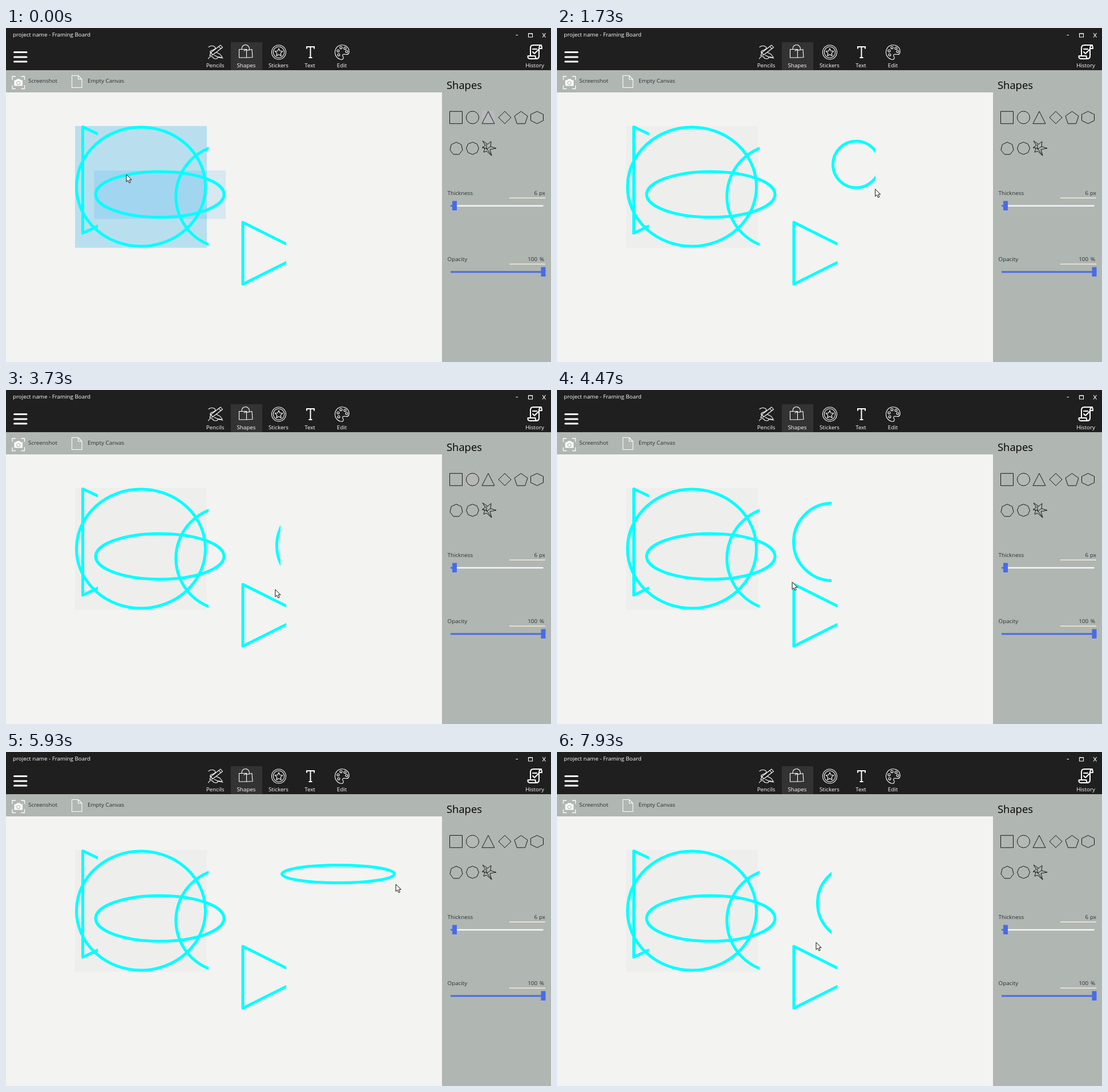
An HTML page that plays this animation: 955x586 px, repeating every 8000 ms.

```html
<!DOCTYPE html>
<html lang="en">
<head>
<meta charset="utf-8">
<title>Drawing shapes</title>
<style>
  html, body { margin: 0; width: 100%; height: 100%; overflow: hidden; background: #b0b6b2; }
  svg { display: block; width: 955px; height: 586px; }
  text { font: 9.8px "Open Sans", "Noto Sans", sans-serif; fill: #2b3133; }
  .light text { fill: #fff; }
  .mid { text-anchor: middle; }
  .end { text-anchor: end; }
  .icon { fill: none; stroke: #fff; stroke-width: 1.1; stroke-linejoin: round; stroke-linecap: round; }
  .ink { fill: none; stroke: #0ff; stroke-width: 5; stroke-linejoin: round; }
  .button { fill: none; stroke: #161819; stroke-width: 1; }
</style>
</head>
<body>
<svg viewBox="0 0 955 586">
  <defs>
    <clipPath id="clipSmall"><rect x="120" y="160" width="41" height="210"/></clipPath>
    <clipPath id="clipArc"><rect x="290" y="195" width="65" height="200"/></clipPath>
    <clipPath id="clipLarge"><rect x="405" y="330" width="86" height="130"/></clipPath>
    <clipPath id="clipDrag"><rect id="dragBox"/></clipPath>
  </defs>

  <rect width="955" height="586" fill="#b0b6b2"/>
  <rect width="955" height="74" fill="#1f1f1f"/>
  <rect x="394" y="25" width="55" height="49" fill="#333"/>
  <rect y="113" width="764" height="473" fill="#f3f3f1"/>

  <g class="light">
    <text x="12" y="15">project name - Framing Board</text>
    <g class="mid">
      <text x="366.5" y="69">Pencils</text>
      <text x="421" y="69">Shapes</text>
      <text x="477.5" y="69">Stickers</text>
      <text x="532.5" y="69">Text</text>
      <text x="588.5" y="69">Edit</text>
      <text x="926.5" y="69">History</text>
    </g>
  </g>

  <g class="icon">
    <path d="M893.5 12.5h3.5M915.5 9.500h7v6.500h-7zM915.500 10h7M940 9l5.500 7.500M945.500 9l-5.500 7.500" stroke-linecap="butt"/>
    <path d="M14.500 42.500h21.500M14.500 51h21.500M14.500 59h21.500" stroke-width="3"/>
    <!-- pencils -->
    <path d="M355 33.500q5-4 10-1t-2 6q-7 2-5 5M359 43l17-13 3.500 4-17 13-5.500 1.500zM373 32.500l3.500 4M359 43l3.500 4"/>
    <path d="M354.500 54q2-4 5-4t4 3q5 2 7 0 1-3 4-2 3 2 5.500 2M365 48l9 4 5-1-4-5-6-3"/>
    <!-- shapes -->
    <path d="M413 36.500a6.700 6.700 0 1 1 13 2M408.500 37.500h13v14.500h-13zM417 40l5-2.500M421.500 39.500l9.500-2 1 14-10 .5"/>
    <!-- stickers -->
    <circle cx="478" cy="42.500" r="12.500"/>
    <circle cx="478" cy="42.500" r="9.700"/>
    <path id="star"/>
    <!-- text -->
    <path d="M527 36.500v-3.500h13v3.500M533.500 33v19M530.500 52h6" stroke-width="2" stroke-linecap="butt" stroke-linejoin="miter"/>
    <!-- palette -->
    <path d="M577 39c2-7 8-10 14-9 7 1 11 7 10 13-1 4-4 4-8 3-4 0-4 3-2 5 1 3-1 5-5 4-7-2-11-9-9-16z"/>
    <circle cx="582" cy="40" r="2"/><circle cx="587" cy="34.500" r="2"/><circle cx="594" cy="35.500" r="2"/>
    <circle cx="597" cy="41" r="2"/><circle cx="583" cy="47" r="2"/>
    <!-- history -->
    <path d="M919 48v-13q0-5 5-5h14q-4 1-4 6v13q0 5-5 5h-11q-4 0-3.500-5h13q0 5 3 5M934 36h5q0-6-3-6M923 37h7M923 42l3 3 8-8" stroke-width="2"/>
    <!-- screenshot -->
    <path d="M11 90.500v-5.500h5.500M27 85h5.500v5.500M32.500 101v5.500h-5.500M16.500 106.500h-5.500v-5.500" stroke-width="1.300"/>
    <path d="M15 92h3l1.500-2h4.500l1.500 2h3v9h-13.500z" fill="#fff"/>
    <circle cx="21.700" cy="96.500" r="3" fill="#fff" stroke="#b0b6b2"/>
    <!-- empty canvas -->
    <path d="M115.500 83.500h11l6.500 6.500v14.500h-17.500zM126.500 83.500v6.500h6.500"/>
  </g>
  <text x="39" y="96">Screenshot</text>
  <text x="143" y="96">Empty Canvas</text>

  <text x="772" y="107" style="font-size:18.4px;fill:#000">Shapes</text>
  <rect id="picked" y="145" width="23" height="24" fill="#b9babd"/>
  <g id="buttons" class="button">
    <circle cx="817.5" cy="157" r="11"/>
    <path d="M835 198l9 6 6-5-1 9 10 3-11 2 3 11-9-8-5 2 2-7-4-2 5-3zM834 210l8 1 9 13M842 204v9l7-5" stroke-linejoin="round"/>
  </g>

  <text x="773.5" y="293">Thickness</text>
  <text x="931" y="293" class="end">6</text>
  <text x="945" y="293" class="end">px</text>
  <text x="773.5" y="409">Opacity</text>
  <text x="931" y="409" class="end">100</text>
  <text x="943" y="409" class="end">%</text>
  <path d="M882 298.300h63M882 414.300h63" stroke="#f6eedb" stroke-width="1.500"/>
  <path d="M779 312h162.500" stroke="#f6f6f6" stroke-width="2.600"/>
  <path d="M779 312h4M779 428h160" stroke="#486be8" stroke-width="3"/>
  <path d="M782 303.500h8v16.500h-8zM937.500 419.500h8v16.500h-8z" fill="#486be8"/>

  <rect x="121" y="172" width="231" height="213.500" fill="#eeeeed"/>
  <rect id="circleGlow" x="121" y="172" width="231" height="213.500" fill="#b9dfee"/>
  <rect id="ellipseGlow" x="154.500" y="250" width="230" height="85" fill="#86c8f2" fill-opacity=".45"/>
  <rect id="ellipseTint" x="352" y="250" width="32.500" height="85" fill="#d7e8f0"/>
  <g class="ink">
    <ellipse cx="236.500" cy="278.500" rx="113" ry="104.500"/>
    <ellipse cx="269.500" cy="292" rx="112.500" ry="40"/>
    <path d="M200 204.500L134.500 173.500V360L200 329" clip-path="url(#clipSmall)"/>
    <circle cx="388.500" cy="295.500" r="90.800" clip-path="url(#clipArc)"/>
    <path d="M521 394L415 341V449.500L521 396.500" clip-path="url(#clipLarge)"/>
    <ellipse id="drawn" clip-path="url(#clipDrag)"/>
  </g>
  <path id="cursor" d="M0 0v12.800l2.900-2.700 2.100 4.700 2.200-1-2.100-4.500h4z" fill="#fff" stroke="#111" stroke-width="1"/>
</svg>
<script>
const LOOP = 8000, DRAG_START = 1400, PICK_TIME = 700, INK = 5;
const origin = { x: 481, y: 196 };
const byId = id => document.getElementById(id);
const setAttrs = (el, attrs) => { for (const key in attrs) el.setAttribute(key, attrs[key]); };

// Regular polygon stretched to fill a w by h box centred on (cx, cy).
function polygonPath(n, cx, cy, w = 22, h = 21.5, turn = 0) {
  const points = Array.from({ length: n }, (_, i) => {
    const a = (i / n) * 2 * Math.PI - Math.PI / 2 + turn;
    return [Math.cos(a), Math.sin(a)];
  });
  const fit = (axis, centre, size) => {
    const values = points.map(p => p[axis]);
    const low = Math.min(...values), span = Math.max(...values) - low;
    return values.map(v => centre + ((v - low) / span - 0.5) * size);
  };
  const xs = fit(0, cx, w), ys = fit(1, cy, h);
  return "M" + xs.map((x, i) => x.toFixed(1) + " " + ys[i].toFixed(1)).join("L") + "Z";
}

const buttons = [
  [4, 788.5, 157, 22, 21.5, Math.PI / 4], [3, 845, 157], [4, 874, 157],
  [5, 902.5, 157, 23], [6, 930.5, 157], [7, 789, 211], [8, 817.5, 211]
];
for (const button of buttons) {
  const path = document.createElementNS("http://www.w3.org/2000/svg", "path");
  path.setAttribute("d", polygonPath(...button));
  byId("buttons").append(path);
}

byId("star").setAttribute("d", "M" + Array.from({ length: 10 }, (_, i) => {
  const a = i * Math.PI / 5 - Math.PI / 2, r = i % 2 ? 3.4 : 7;
  return (478 + r * Math.cos(a)).toFixed(1) + " " + (43 + r * Math.sin(a)).toFixed(1);
}).join("L") + "Z");

// Pointer path: time, x, y.
const pointer = [
  [0, 211, 257], [70, 211, 257], [400, 600, 196], [620, 815, 160], [740, 822, 158],
  [870, 771, 166], [1230, 500, 192], [1400, 481, 196], [1730, 557.5, 282.5],
  [2070, 616, 336], [2200, 616, 336], [3070, 542, 359], [3730, 472, 350],
  [3930, 450, 344], [4350, 399, 338], [4800, 505, 334], [5200, 605, 318],
  [5670, 661, 268], [5930, 683, 232], [6150, 717, 300], [6530, 711.5, 452],
  [6600, 710, 452], [7400, 527, 434], [7930, 454, 334], [8000, 454, 334]
];

// Monotone cubic interpolation: smooth, without overshooting the keys.
function pointerAt(t, axis) {
  const slope = i => pointer[i + 1] && i >= 0
    ? (pointer[i + 1][axis] - pointer[i][axis]) / (pointer[i + 1][0] - pointer[i][0]) : 0;
  const tangent = i => {
    const a = slope(i - 1), b = slope(i);
    return a * b > 0 ? 2 * a * b / (a + b) : 0;
  };
  let i = 0;
  while (i < pointer.length - 2 && t >= pointer[i + 1][0]) i++;
  const span = pointer[i + 1][0] - pointer[i][0], u = (t - pointer[i][0]) / span;
  const ease = u * u * (3 - 2 * u);
  return pointer[i][axis] * (1 - ease) + pointer[i + 1][axis] * ease
    + span * u * (1 - u) * (tangent(i) * (1 - u) - tangent(i + 1) * u);
}

function drawDrag(x, y, active) {
  const left = Math.min(x, origin.x), top = Math.min(y, origin.y);
  const width = Math.abs(x - origin.x), height = Math.abs(y - origin.y);
  const rx = Math.max(width, height) / 2, ry = height / 2;
  setAttrs(byId("dragBox"), { x: left, y: top, width, height });
  setAttrs(byId("drawn"), {
    cx: left + rx, cy: top + ry,
    rx: Math.max(0, rx - INK / 2), ry: Math.max(0, ry - INK / 2),
    visibility: active ? "visible" : "hidden"
  });
}

function frame(now) {
  const t = now % LOOP;
  const x = pointerAt(t, 1), y = pointerAt(t, 2);
  const fade = (from, to) => Math.min(1, Math.max(0, (to - t) / (to - from)));
  byId("circleGlow").setAttribute("opacity", fade(150, 350));
  for (const id of ["ellipseGlow", "ellipseTint"]) byId(id).setAttribute("opacity", fade(120, 300));
  setAttrs(byId("picked"), t < PICK_TIME ? { x: 833.5, fill: "#b9babd" } : { x: 806, fill: "#b4b9b6" });
  drawDrag(x, y, t >= DRAG_START);
  byId("cursor").setAttribute("transform", `translate(${x} ${y})`);
  requestAnimationFrame(frame);
}
frame(0);
</script>
</body>
</html>
```
